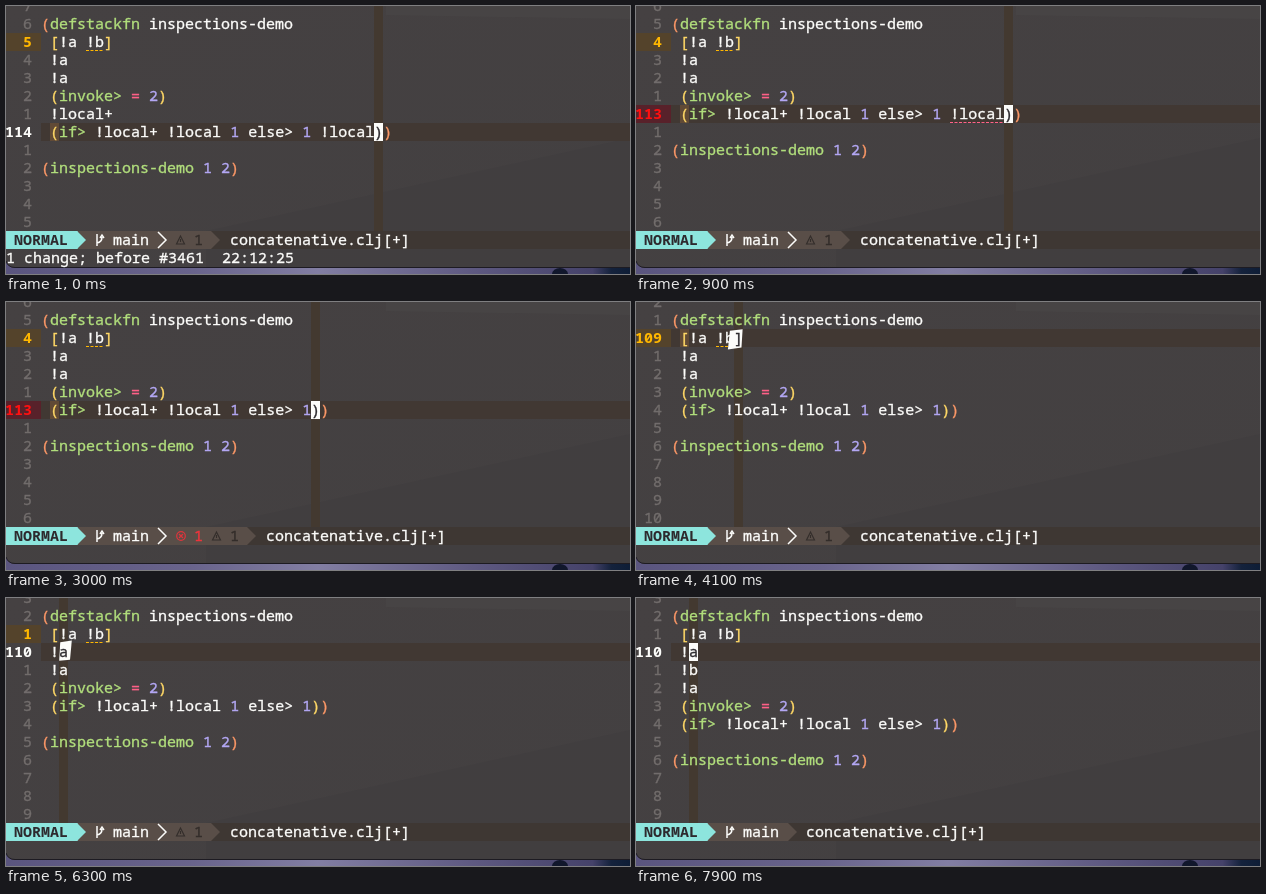
An HTML page that plays this animation: 624x268 px, repeating every 8 s.

```html
<!DOCTYPE html>
<html lang="en">
<head>
<meta charset="utf-8">
<title>Editor session</title>
<style>
  html, body { margin: 0; width: 100%; height: 100%; overflow: hidden; background: #1b1a28; }
  svg { display: block; width: 624px; height: 268px; }
  text {
    font: 15px "Noto Sans Mono", "DejaVu Sans Mono", monospace; white-space: pre;
    fill: currentColor; stroke: currentColor; stroke-width: .35px;
  }
  .b { font-weight: 700; stroke: none; }
</style>
</head>
<body>
<svg viewBox="0 0 624 268" xmlns="http://www.w3.org/2000/svg">
  <defs>
    <linearGradient id="pane" x2="1" y2="1">
      <stop offset="0" stop-color="#454142"/>
      <stop offset="1" stop-color="#434041"/>
    </linearGradient>
    <linearGradient id="desk">
      <stop offset="0" stop-color="#5a557f"/>
      <stop offset=".3" stop-color="#69648c"/>
      <stop offset=".5" stop-color="#827ea3"/>
      <stop offset=".75" stop-color="#5e5981"/>
      <stop offset=".94" stop-color="#45426a"/>
      <stop offset=".97" stop-color="#14223c"/>
      <stop offset="1" stop-color="#0e1d36"/>
    </linearGradient>
  </defs>
  <rect y="255" width="624" height="13" fill="url(#desk)"/>
  <ellipse cx="554" cy="268" rx="8" ry="6" fill="#11172c"/>
  <path d="M0 0H624V262H9Q2 262 0 255Z" fill="url(#pane)"/>
  <path d="M200 225L624 132V261H200Z" fill="#3d393c" opacity=".35"/>
  <path d="M380 0H624V13L380 9Z" fill="#4a4848" opacity=".5"/>
  <path d="M0 255Q2 261.5 9 261.5H624" fill="none" stroke="#1d1b22" stroke-width="1"/>
  <g id="view"></g>
</svg>
<script>
const LOOP = 8000, TICK = 100;
const CW = 9, RH = 18, X0 = 35, Y0 = 9, FIRST = 108, STATUS_Y = 225;
const C = {
  fg: '#fcfcfa', dim: '#726d6c', dark: '#2d2a2e', line: '#413833', col: '#433930',
  green: '#b1de7c', purple: '#b3a7f4', red: '#ff6188', yellow: '#ffd866', orange: '#fc9867',
  warn: '#ffb700', warnBg: '#54432b', err: '#ff1010', errBg: '#58212a',
  teal: '#8de5dd', branch: '#594e48', bar: '#3e3733', shade: '#332d2a'
};

// Each step changes part of the editor state at a given time.
const steps = [
  [0, { row: 6, col: 37, extra: true, tail: ' !local', added: null, warn: true, err: false,
        errCount: false, msg: '1 change; before #3461  22:12:25', mode: 'NORMAL', hint: false }],
  [100, { row: 5, extra: false, msg: '' }],
  [500, { err: true }],
  [1600, { errCount: true }],
  [2200, { tail: '', col: 30 }],
  [3300, { err: false }],
  [3600, { row: 4, col: 13, errCount: false }],
  [3800, { row: 3, col: 2 }],
  [3900, { row: 2 }],
  [4100, { row: 1, col: 7 }],
  [4500, { col: 5 }],
  [4900, { hint: true }],
  [6300, { row: 2, col: 2, hint: false }],
  [6500, { row: 3, col: 1, added: ' ', mode: 'INSERT' }],
  [6800, { added: ' !', col: 2 }],
  [7000, { added: ' !b', col: 3 }],
  [7400, { mode: 'NORMAL', col: 2 }],
  [7600, { row: 2 }],
  [7900, { warn: false }]
];

const view = document.getElementById('view');
const cx = col => X0 + col * CW;
const ry = row => Y0 + row * RH;
const esc = s => s.replace(/&/g, '&amp;').replace(/</g, '&lt;').replace(/>/g, '&gt;');
const rect = (x, y, w, h, fill) => `<rect x="${x}" y="${y}" width="${w}" height="${h}" fill="${fill}"/>`;
const text = (x, y, s, color, cls = '') => `<text x="${x}" y="${y + 14}" color="${color}" class="${cls}">${esc(s)}</text>`;
const path = (d, fill, stroke = 'none', w = 1) => `<path d="${d}" fill="${fill}" stroke="${stroke}" stroke-width="${w}"/>`;
const dashes = (x, y, w, color) =>
  `<path d="M${x} ${y + 17.5}h${w}" stroke="${color}" stroke-width="1" stroke-dasharray="3 1.5"/>`;

function stateAt(t) {
  const s = { at: -LOOP };
  for (const [time, change] of steps) {
    if (time > t) break;
    const { row, col } = s;
    Object.assign(s, change);
    if (time && (row !== s.row || col !== s.col)) s.from = { row, col }, s.at = time;
  }
  s.from = s.from || { row: s.row, col: s.col };
  return s;
}

function bufferOf(s) {
  return [
    '(defstackfn inspections-demo', ' [!a !b]', ' !a',
    ...(s.added === null ? [] : [s.added]),
    ' !a', ' (invoke> = 2)',
    ...(s.extra ? [' !local+'] : []),
    ` (if> !local+ !local 1 else> 1${s.tail}))`, '', '(inspections-demo 1 2)'
  ];
}

function code(lines) {
  let depth = 0, out = '';
  const level = d => d === 1 ? C.orange : C.yellow;
  lines.forEach((line, row) => {
    let prev = '', spans = '';
    for (const tok of line.match(/[()[\]]|\s+|[^\s()[\]]+/g) || []) {
      let color = C.fg;
      if (/[([]/.test(tok)) color = level(++depth);
      else if (/[)\]]/.test(tok)) color = level(depth--);
      else if (prev === '(') color = C.green;
      else if (tok === '=') color = C.red;
      else if (/^\d+$/.test(tok)) color = C.purple;
      spans += `<tspan color="${color}">${esc(tok)}</tspan>`;
      prev = tok;
    }
    out += `<text x="${X0}" y="${ry(row) + 14}">${spans}</text>`;
  });
  return out;
}

function gutter(s) {
  let out = '';
  for (let row = -1; row < 12; row++) {
    const here = row === s.row, y = ry(row);
    const warn = s.warn && row === 1, err = s.err && row === 5;
    if (warn || err) out += rect(0, y, X0, RH, warn ? C.warnBg : C.errBg);
    const label = String(here ? FIRST + row : Math.abs(row - s.row));
    const color = warn ? C.warn : err ? C.err : here ? C.fg : C.dim;
    out += text(26 - label.length * CW, y, label, color, here || warn ? 'b' : '');
  }
  return out;
}

// The corners furthest behind the direction of travel settle last.
function cursor(s, t, lines) {
  const x = cx(s.col), y = ry(s.row);
  const dx = cx(s.from.col) - x, dy = ry(s.from.row) - y, len = Math.hypot(dx, dy) || 1;
  const w = s.mode === 'INSERT' ? 2 : CW, age = t - s.at + 90;
  const points = [[-1, -1], [1, -1], [1, 1], [-1, 1]].map(([u, v]) => {
    const left = Math.exp(-age / (32 + 10 * (u * dx + v * dy) / len));
    return [x + (u > 0 ? w : 0) + dx * left, y + (v > 0 ? RH : 0) + dy * left]
      .map(n => n.toFixed(2)).join();
  });
  const under = (lines[s.row] || '')[s.col] || '';
  return `<polygon points="${points.join(' ')}" fill="${C.fg}"/>` +
    (w === CW ? text(x, y, under, C.dark) : '');
}

function statusBar(s) {
  const y = STATUS_Y, mid = y + RH / 2, end = y + RH;
  const arrow = (x, fill) => path(`M${x} ${y}l9 9l-9 9z`, fill);
  const tip = !s.warn ? 152 : s.errCount ? 241 : 205;
  const modeBg = s.mode === 'INSERT' ? C.green : C.teal;
  let out = rect(0, y, 624, RH, C.bar) + rect(71, y, tip - 71, RH, C.branch) + arrow(tip, C.branch);
  out += rect(0, y, 71.5, RH, modeBg) + arrow(71, modeBg) + text(8, y, s.mode, C.dark, 'b');
  out += path(`M91 ${y + 3}V${end - 3}M91 ${mid + 3}Q96 ${mid + 2} 96 ${mid - 3}M94 ${mid - 2}l2 -3l2 3`, 'none', C.fg, 1.5);
  out += text(107, y, 'main', C.fg);
  if (s.warn) {
    out += path(`M152 ${y + 1}l8 8l-8 8`, 'none', C.fg, 1.5);
    let x = 170;
    if (s.errCount) {
      out += `<circle cx="175" cy="${mid}" r="4.3" fill="none" stroke="#e0343c" stroke-width="1.2"/>` +
        path(`M173 ${mid - 2}l4 4m0 -4l-4 4`, 'none', '#e0343c', 1.2) + text(188, y, '1', '#f0343c');
      x += 4 * CW;
    }
    out += path(`M${x + 4.5} ${mid - 4}l4 8h-8zM${x + 4.5} ${mid - 1}v3`, 'none', C.shade, 1.1);
    out += text(x + 2 * CW, y, '1', C.shade);
  }
  return out + text(tip + (s.warn ? 19 : 18), y, 'concatenative.clj[+]', C.fg);
}

function hint() {
  const x = cx(5), y = ry(2);
  return rect(x, y, 29 * CW, 2 * RH, '#343033') + text(x, y, 'Diagnostics:', C.fg, 'b') +
    text(x, y + RH, '1. Unused local variable: !b', C.warn);
}

function render(t) {
  const s = stateAt(t), lines = bufferOf(s);
  let out = rect(cx(s.col), 0, CW, STATUS_Y, C.col) + rect(X0, ry(s.row), 624 - X0, RH, C.line);
  if (/[)\]]/.test(lines[s.row][s.col] || '')) out += rect(cx(1), ry(s.row), CW, RH, '#614a36');
  out += gutter(s) + code(lines);
  if (s.warn) out += dashes(cx(5), ry(1), 2 * CW, C.warn);
  if (s.err && s.tail) out += dashes(cx(31), ry(5), 6 * CW, C.red);
  if (s.hint) out += hint();
  out += cursor(s, t, lines) + statusBar(s) + text(0, 243, s.msg, C.fg);
  view.innerHTML = out;
}

let shown = -1;
function loop() {
  const t = Math.floor(performance.now() % LOOP / TICK) * TICK;
  if (t !== shown) render(shown = t);
  requestAnimationFrame(loop);
}
loop();
</script>
</body>
</html>
```
